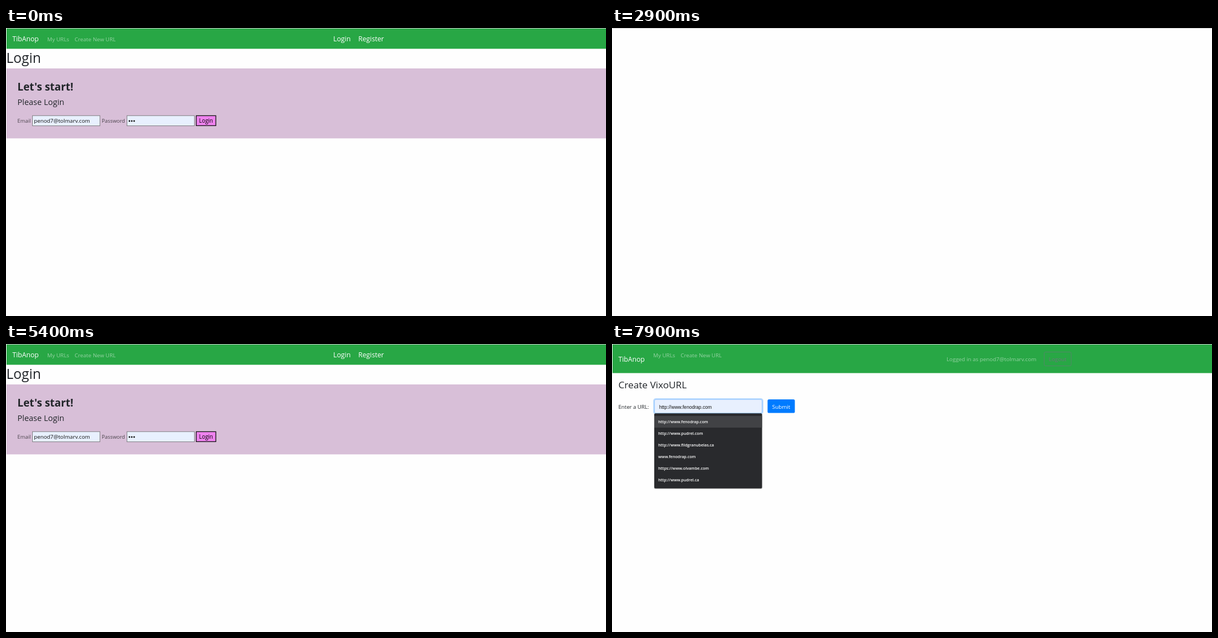
Write an HTML page that moves like this. It is 1078 px wide and 520 px high and loops after 8000 ms.

```html
<!DOCTYPE html>
<html lang="en">
<head>
<meta charset="utf-8">
<title>Short link app</title>
<style>
  html, body { margin: 0; width: 100%; height: 100%; overflow: hidden; background: #fefefe; }
  svg { display: block; width: 100%; height: 100%; }
  text { font-family: "Open Sans", "Noto Sans", sans-serif; white-space: pre; }
  .plain { font-family: "Liberation Sans", Arial, sans-serif; }
</style>
</head>
<body>
<svg id="stage" viewBox="0 0 1078 520" preserveAspectRatio="none"></svg>
<script>
const LOOP = 8000;
const BRAND = "TibAnop";
const EMAIL = "penod7@tolmarv.com";
const LINKS = [
  "http://www.fenodrap.com",
  "http://www.pudrel.com",
  "http://www.fildgranubelas.ca",
  "www.fenodrap.com",
  "https://www.olvambe.com",
  "http://www.pudrel.ca"
];
const INK = "#212529", GREEN = "#28a745", FILLED = "#e8f0fe", GREY = "#6c757d";
const DIM = "rgba(255,255,255,.5)", LIT = "rgba(255,255,255,.75)";

const stage = document.getElementById("stage");

function add(parent, tag, attrs = {}) {
  const el = document.createElementNS("http://www.w3.org/2000/svg", tag);
  for (const key in attrs) el.setAttribute(key, attrs[key]);
  parent.appendChild(el);
  return el;
}
const group = parent => add(parent, "g");
const rect = (parent, x, y, width, height, fill, more) =>
  add(parent, "rect", { x, y, width, height, fill, ...more });
function text(parent, x, y, size, str, fill = INK, weight = 400, more) {
  const el = add(parent, "text", { x, y, "font-size": size, "font-weight": weight, fill, ...more });
  el.textContent = str;
  return el;
}
const show = (el, on) => el.setAttribute("visibility", on ? "inherit" : "hidden");
const paint = (el, fill) => el.setAttribute("fill", fill);

function dots(parent, x, y) {
  const g = group(parent);
  for (let i = 0; i < 3; i++) add(g, "circle", { cx: x + 4.2 * i, cy: y, r: 1.45, fill: "#111" });
  return g;
}

function field(parent, x, y, width) {
  return rect(parent, x, y, width, 24.5, "#fff", { rx: 2.6, stroke: "#ced4da", "stroke-width": 0.8 });
}

function blueButton(parent, x, y, width, label) {
  const ring = rect(parent, x - 1, y - 1, width + 2, 26.5, "none",
    { rx: 3.5, stroke: "#007bff", "stroke-opacity": 0.5, "stroke-width": 2 });
  const face = rect(parent, x, y, width, 24.5, "#007bff", { rx: 2.6 });
  text(parent, x + width / 2, y + 16.5, 9.8, label, "#fff", 400, { "text-anchor": "middle" });
  show(ring, false);
  return { ring, face };
}

function navBar(parent, height, brandY) {
  rect(parent, 1, 1, 1077, height, GREEN);
  text(parent, 11.5, brandY, 12.2, BRAND, "#fff");
  text(parent, 74, 23.6, 9.85, "My URLs", DIM);
  return text(parent, 123.3, 23.6, 9.85, "Create New URL", DIM);
}

function guestNav(parent) {
  navBar(parent, 36.5, 24.2);
  text(parent, 588, 24.2, 12.3, "Login", "#fff");
  text(parent, 633, 24.2, 12.2, "Register", "#fff");
}

// Shared by every signed-in page
const member = group(stage);
const createLink = navBar(member, 51.5, 31.8);
const account = text(member, 601, 31.3, 9.85, "Logged in as " + EMAIL, DIM);
const logoutBox = rect(member, 776.5, 14.5, 48.5, 25, GREY,
  { rx: 2.6, stroke: GREY, "stroke-width": 0.8, "stroke-opacity": 0.8 });
const logoutText = text(member, 800.7, 31.3, 9.8, "Logout", GREY, 400, { "text-anchor": "middle" });

const login = group(stage);
guestNav(login);
text(login, 0.5, 63, 24.6, "Login", INK, 500);
rect(login, 1, 73, 1077, 126.3, "#d8bfd8");
text(login, 20.5, 112.8, 18.9, "Let's start!", INK, 700);
text(login, 20.5, 138.8, 14.5, "Please Login", INK, 500);
text(login, 20.5, 171.3, 9.4, "Email", "#4b444d");
text(login, 172, 171.3, 9.3, "Password", "#4b444d");
for (const x of [47.6, 217.3])
  rect(login, x, 158.2, 121.2, 18.4, FILLED, { stroke: "#767676", "stroke-width": 0.9 });
const loginEmail = text(login, 50.3, 171.2, 9.75, EMAIL, "#111");
const loginDots = dots(login, 221.8, 168);
const loginButton = rect(login, 341.8, 158.3, 35.2, 18, "#ee82ee", { stroke: "#111" });
text(login, 359.4, 171.2, 9.9, "Login", "#000", 400, { "text-anchor": "middle" });

const failed = group(stage);
text(failed, 6.5, 16, 10.3, "error_401", "#000", 400,
  { style: 'font-family:"Liberation Serif","Times New Roman",serif' });

const register = group(stage);
guestNav(register);
text(register, 11.5, 59.5, 19.6, "Register", INK, 500);
text(register, 11.5, 85.3, 9.7, "Email:");
text(register, 224, 85.3, 9.3, "Password");
const regFields = [field(register, 51.4, 69.4, 162), field(register, 274.6, 69.4, 162)];
const regEmail = text(register, 59.5, 85.3, 9.75, EMAIL, "#111");
const regDots = dots(register, 285, 82);
const regButton = blueButton(register, 446.5, 69.3, 55, "Register");

const list = group(stage);
text(list, 11.5, 80.3, 17.3, "My URLs", INK, 500);
rect(list, 12, 89.5, 1066, 0.8, "#dee2e6");
rect(list, 12, 121, 1066, 1.3, "#dee2e6");
[[19, "Short URL"], [362, "Long URL"], [691, "Edit"], [873, "Delete"]]
  .forEach(([x, str]) => text(list, x, 109.8, 9.8, str, INK, 700));

const create = group(stage);
text(create, 11.5, 80.3, 17.2, "Create VixoURL", INK, 500);
text(create, 11.5, 116.5, 9.65, "Enter a URL:");
const urlRing = rect(create, 75.2, 99, 195.6, 27, "none",
  { rx: 3.6, stroke: "#007bff", "stroke-opacity": 0.28, "stroke-width": 2.2 });
const urlField = field(create, 76.4, 100.2, 193.2);
const urlHint = text(create, 84.7, 116.5, 9.8, "http://", GREY);
const urlText = text(create, 84.7, 116.5, 8.6, LINKS[0], "#111", 400, { class: "plain" });
const caret = rect(create, 85, 105, 1, 14, "#111");
blueButton(create, 279.5, 100, 49, "Submit");

const menu = group(create);
rect(menu, 75.4, 125.4, 194.8, 136.4, "#000", { rx: 2.5, "fill-opacity": 0.22 });
rect(menu, 76, 125.2, 193.5, 135.6, "#292a2d", { rx: 2 });
const menuRow = rect(menu, 76, 130, 193.5, 21, "#414245");
LINKS.forEach((str, i) => text(menu, 83, 143.2 + 21.05 * i, 7.15, str, "#fff", 600));

rect(stage, 1, 0, 1077, 1, "#cfcfcf");

const pages = { login, failed, register, list, create };
const timeline = [
  [0, "login"], [1100, "failed"], [2200, "login"], [2900, ""], [3100, "register"],
  [3800, ""], [4000, "list"], [4900, ""], [5200, "login"], [5900, ""],
  [6200, "list"], [6800, ""], [7000, "create"]
];

function draw(t) {
  const within = (from, to) => t >= from && t < to;
  const page = timeline.filter(([start]) => start <= t).pop()[1];
  for (const name in pages) pages[name].setAttribute("visibility", name === page ? "visible" : "hidden");
  member.setAttribute("visibility", page === "list" || page === "create" ? "visible" : "hidden");

  show(loginEmail, !within(5200, 5400));
  show(loginDots, !within(2200, 2700) && !within(5200, 5400));
  const pressed = within(800, 1100) || within(5700, 5900);
  loginButton.setAttribute("stroke-width", pressed ? 2 : 1.3);

  regFields.forEach(f => paint(f, t >= 3300 ? FILLED : "#fff"));
  show(regEmail, t >= 3300);
  show(regDots, t >= 3400);
  paint(regButton.face, t >= 3600 ? "#0069d9" : "#007bff");
  show(regButton.ring, t >= 3700);

  paint(account, within(4200, 4600) ? LIT : DIM);
  paint(createLink, within(6400, 6800) ? LIT : DIM);
  const over = within(4700, 4900) ? Math.min(1, (t - 4650) / 150) : 0;
  logoutBox.setAttribute("fill-opacity", over);
  paint(logoutText, over ? "#fff" : GREY);

  const focused = t >= 7400, chosen = t >= 7700;
  show(urlRing, focused);
  urlField.setAttribute("stroke", focused ? "#80bdff" : "#ced4da");
  paint(urlField, chosen ? FILLED : "#fff");
  show(urlHint, !chosen);
  show(urlText, chosen);
  show(caret, within(7400, 7900));
  show(menu, t >= 7500);
  show(menuRow, chosen);
}

// A hidden menu must also hide its highlighted row, so visibility inherits throughout.
const begin = performance.now();
function tick() {
  draw((performance.now() - begin) % LOOP);
  requestAnimationFrame(tick);
}
tick();
</script>
</body>
</html>
```
